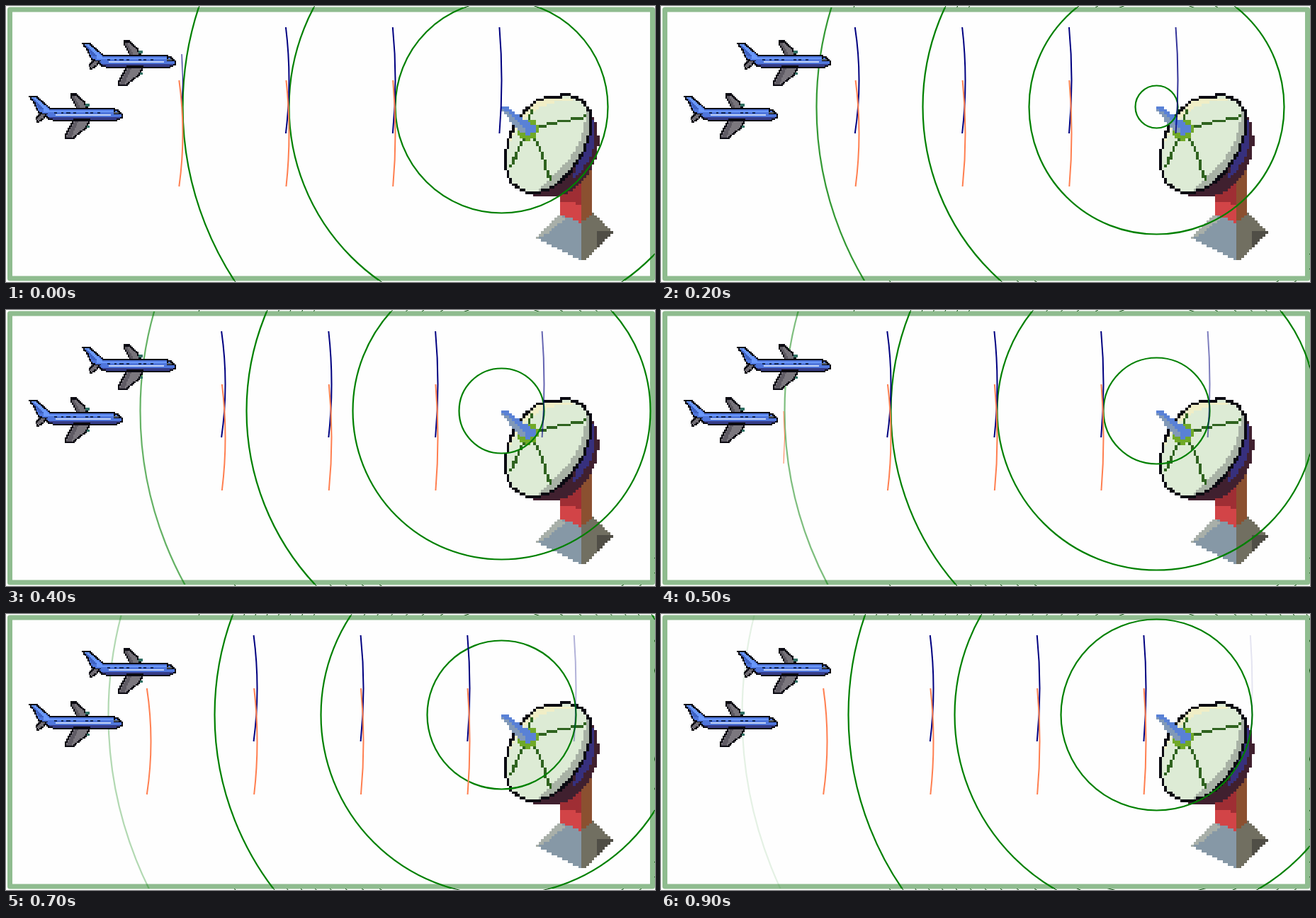
An HTML page with a canvas for the animation above (1000 ms loop, 916x390 px).

```html
<!DOCTYPE html>
<html lang="en">
<head>
<meta charset="utf-8">
<title>Radar echoes</title>
<style>
  html, body { margin: 0; width: 100%; height: 100%; overflow: hidden; background: #fff; }
  canvas { display: block; }
</style>
</head>
<body>
<canvas id="stage" width="916" height="390"></canvas>
<script>
const W = 916, H = 390, STEP = 15, GAP = 150, FRAMES = 10;
const ctx = document.getElementById('stage').getContext('2d');
const radar = { x: 699.5, y: 142.5 };

function layer(w, h) {
  const c = document.createElement('canvas');
  c.width = w;
  c.height = h;
  return c;
}

// Paints vector shapes as hard-edged blocks of the given cell size.
function pixelArt(w, h, cell, x0, y0, shapes) {
  const art = layer(w, h), g = art.getContext('2d');
  for (const [d, fill, line, width] of shapes) {
    const path = new Path2D(d);
    g.lineWidth = width || 1;
    g.lineJoin = 'round';
    for (let j = 0; j * cell < h; j++) {
      for (let i = 0; i * cell < w; i++) {
        const px = x0 + (i + 0.5) * cell, py = y0 + (j + 0.5) * cell;
        const color = line && g.isPointInStroke(path, px, py) ? line
          : fill && g.isPointInPath(path, px, py) ? fill : null;
        if (!color) continue;
        const left = Math.round(i * cell), top = Math.round(j * cell);
        g.fillStyle = color;
        g.fillRect(left, top, Math.round((i + 1) * cell) - left, Math.round((j + 1) * cell) - top);
      }
    }
  }
  return art;
}

const INK = '#0b0a12';
const plane = pixelArt(136, 68, 1.9, 0, 0, [
  ['M59 2 L67 2 L78 12 L82 21 L68 22 Z', '#77737a', INK, 2.4],
  ['M60 4 L64 4 L73 21 L69 21 Z', '#5c5860'],
  ['M79 15 h6 v4 h-6 Z', '#2f6f62'],
  ['M2 5 L11 5 L30 22 L118 22 L127 25 L132 30 L132 35 L122 39 L40 39 L28 36 L14 26 L10 19 Z', '#4f76dc', INK, 2.4],
  ['M4 6 L10 6 L29 24 L118 24 L123 27 H32 L22 26 Z', '#6a98fa'],
  ['M4 7 L7 7 L22 23 L16 23 Z', '#3f62c2'],
  ['M26 34 H131 L122 38 H40 L29 36 Z', '#353c88'],
  ['M34 30 H116 V33 H42 Z', '#c3d4f6'],
  ['M120 26 L127 27 L130 30 L120 30 Z', '#5c656c', INK, 1.2],
  ['M36 28 h4 m5 0 h5 m4 0 h4 m5 0 h4 m12 0 h4 m4 0 h5 m4 0 h4', null, '#142755', 2.4],
  ['M18 29 L25 30 L20 37 L13 41 L10 36 Z', '#716d74', INK, 2],
  ['M63 38 L86 38 L80 50 L62 64 L52 64 L53 58 Z', '#7b777e', INK, 2.4],
  ['M65 40 L70 40 L60 62 L54 62 Z', '#5f5b64'],
  ['M81 46 h5 v4 h-5 Z', '#2f6f62']
]);

const dish = pixelArt(164, 240, 3.75, 699, 123, [
  ['M811 232 L827 222 V302 L811 307 Z', '#8b5030'],
  ['M782 240 H812 V307 L782 296 Z', '#d24447'],
  ['M782 240 H812 V282 L801 278 L782 276 Z', '#9f2e34'],
  ['M781 294 L812 306 V360 L749 328 Z', '#8698a6'],
  ['M781 294 L790 300 L764 321 L749 328 Z', '#a8afa9'],
  ['M812 306 L827 292 L833 296 L857 321 L816 360 H811 Z', '#716f61'],
  ['M833 318 L857 320 L836 341 Z', '#504e46'],
  ['M822 142 L832 163 L837 190 L834 213 L822 239 L799 261 L772 270 L744 268 L760 230 Z', '#40202f'],
  ['M824 150 L831 164 L832 192 L824 216 L809 237 L800 243 L812 205 Z', '#37307d'],
  ['M766 128 L794 126 L813 133 L824 149 L825 178 L815 206 L797 233 L774 255 L752 263 L732 262 L713 250 L706 231 L706 202 L715 174 L731 149 L747 135 Z', '#ddebd5', INK, 3.8],
  ['M818 142 L823 153 L823 179 L813 205 L795 231 L773 253 L752 261 L768 245 L794 219 L811 188 L818 160 Z', '#a8b2a5'],
  ['M750 135 L768 130 L792 129 L806 134 L782 134 L757 141 L737 155 L722 172 L710 194 L718 173 L733 151 Z', '#f0eec6'],
  ['M738 173 L818 156 M746 186 L757 208 L763 232 L769 247 M733 180 L712 228 M736 165 L743 147', null, '#2f631f', 3.8],
  ['M728 163 L744 160 L752 170 L748 184 L737 190 L724 185 L722 174 Z', '#70a928'],
  ['M699 142 L705 141 L748 171 L745 180 L735 182 L700 149 Z', '#5981d6'],
  ['M700 146 L708 149 L733 173 L730 180 L717 169 L704 153 Z', '#8199b8']
]);

function stroke(color, alpha, width) {
  ctx.strokeStyle = color;
  ctx.globalAlpha = alpha;
  ctx.lineWidth = width;
  ctx.stroke();
  ctx.globalAlpha = 1;
}

function ring(r, color, alpha, width) {
  if (r <= 0) return;
  ctx.beginPath();
  ctx.arc(radar.x, radar.y, r, 0, Math.PI * 2);
  stroke(color, alpha, width);
}

// Slice of a large circle, 2 * half tall, whose rightmost point is (x, y).
function echo(x, y, centre, half, color, alpha, width) {
  const r = x - centre, a = Math.asin(half / r);
  ctx.beginPath();
  ctx.arc(centre, y, r, -a, a);
  stroke(color, alpha, width);
}

// An echo is short and thin at the moment it leaves its plane.
function drawEchoes(k) {
  for (let n = 0; n < 4; n++) {
    const fresh = k === 0 && n === 0;
    const alpha = n === 3 ? 1 - k / FRAMES : 1;
    echo(249.5 + k * STEP + n * GAP, 105, -215, fresh ? 37 : 75, 'navy', alpha, fresh ? 1 : 2);
  }
  for (let x = 174.5 + (k + 5) % FRAMES * STEP; x < 699; x += GAP) {
    const fresh = x < 175;
    echo(x, 180, -295, fresh ? 37 : 75, 'coral', 1, fresh ? 1 : 2);
  }
}

function drawRings(k) {
  for (let n = 0; n < 4; n++) {
    ring(k * STEP + n * GAP, 'green', n === 3 ? 1 - k / FRAMES : 1, 2.2);
  }
}

// The outermost edge keeps small marks of every ring since the loop began.
function drawRim(k) {
  ctx.save();
  ctx.beginPath();
  ctx.rect(0, 0, W, H);
  ctx.rect(2, 2, W - 3, H - 4);
  ctx.clip('evenodd');
  for (let j = 0; j <= k; j++) {
    for (let n = 0; n < 3; n++) ring(j * STEP + n * GAP, '#004000', 1, 1);
    if (j === 0) ring(3 * GAP, '#004000', 1, 1);
  }
  ctx.restore();
}

function draw(k) {
  ctx.fillStyle = '#fff';
  ctx.fillRect(0, 0, W, H);
  ctx.beginPath();
  ctx.rect(5.5, 5, 907, 380);
  ctx.fillStyle = '#fefefe';
  ctx.fill();
  ctx.lineJoin = 'round';
  stroke('darkseagreen', 1, 7);

  ctx.drawImage(dish, 699, 123);
  ctx.save();
  ctx.beginPath();
  ctx.rect(2, 2, W - 3, H - 4);
  ctx.clip();
  drawRings(k);
  drawEchoes(k);
  ctx.restore();
  drawRim(k);
  ctx.drawImage(plane, 107, 48);
  ctx.drawImage(plane, 32, 123);
}

let shown = -1;
function tick() {
  const k = Math.floor(performance.now() / 100) % FRAMES;
  if (k !== shown) draw(shown = k);
  requestAnimationFrame(tick);
}
tick();
</script>
</body>
</html>
```
